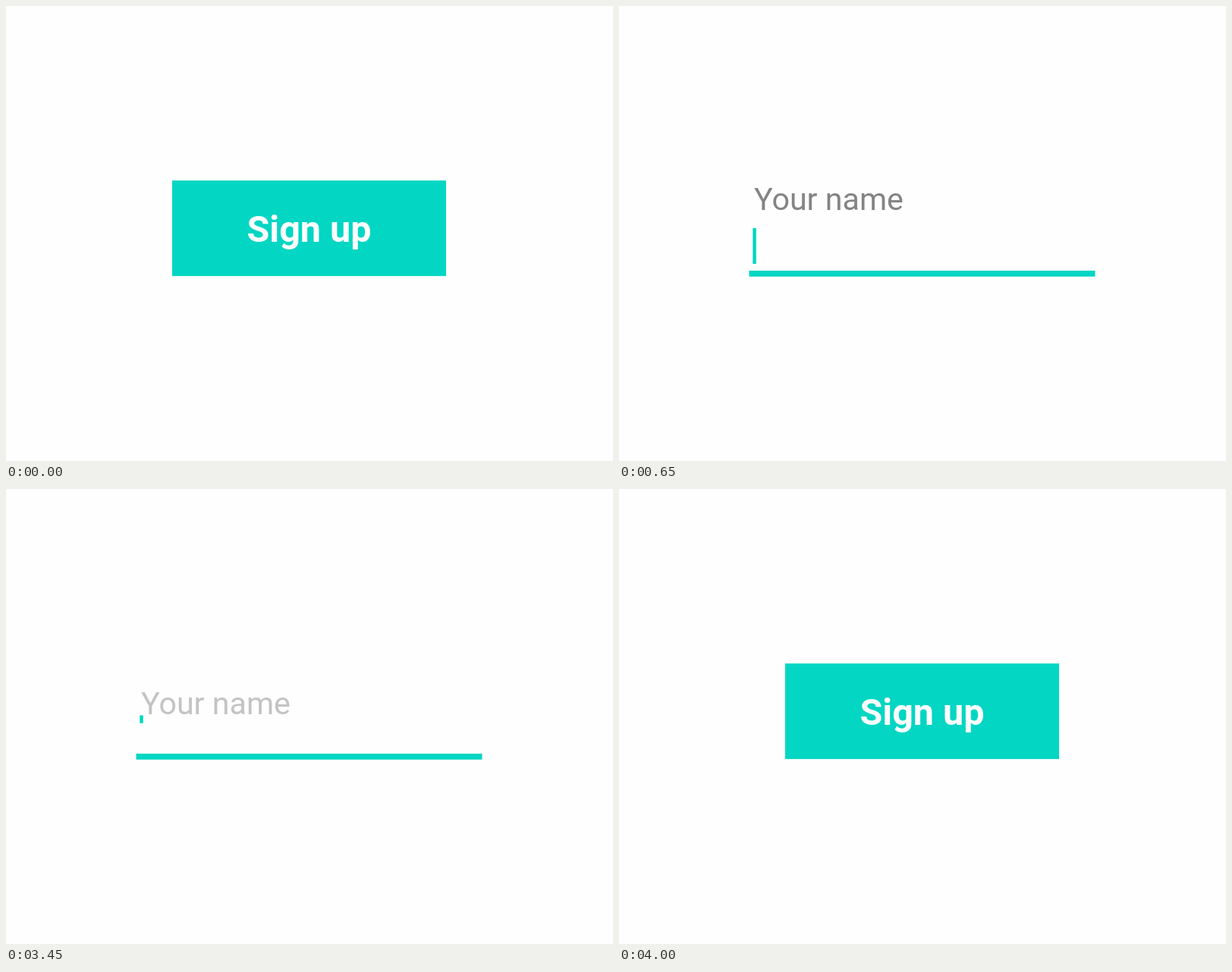
Animation of 800x600 px, one loop 4750 ms. Source, as an HTML page with a canvas:

```html
<!DOCTYPE html>
<html lang="en">
<head>
<meta charset="utf-8">
<title>Sign up button</title>
<style>
  html, body { margin: 0; width: 100%; height: 100%; overflow: hidden; background: #fefefe; }
  canvas { display: block; }
</style>
</head>
<body>
<canvas id="stage" width="800" height="600"></canvas>
<script>
const ctx = document.getElementById('stage').getContext('2d');
const LOOP = 4750, STEP = 50;
const TEAL = '#03d6c3', PAPER = '#fefefe', GREY = '#848484';

const mix = (a, b, k) => a + (b - a) * k;

// Cubic ease-out from 0 to 1
function ease(t, start, duration) {
  const u = Math.min(1, Math.max(0, (t - start) / duration));
  return 1 - (1 - u) ** 3;
}

// 0 -> 1 on the way in, back to 0 on the way out
const inOut = (t, inAt, inFor, outAt, outFor) =>
  ease(t, inAt, inFor) - ease(t, outAt, outFor);

function drawBar(t) {
  const flat = inOut(t, 0, 400, 3600, 400);
  const wide = inOut(t, 150, 320, 3700, 340);
  const left = mix(219, 171.5, wide), right = mix(580, 627.5, wide);
  const bottom = mix(356.1, 356.8, flat), height = mix(126, 7.8, flat);
  ctx.fillStyle = TEAL;
  ctx.fillRect(left, bottom - height, right - left, height);

  // The caption shows only where the bar lies behind it
  ctx.save();
  ctx.beginPath();
  ctx.rect(left, bottom - height, right - left, height);
  ctx.clip();
  ctx.fillStyle = PAPER;
  ctx.font = 'bold 48.5px Roboto, sans-serif';
  ctx.textAlign = 'center';
  ctx.fillText('Sign up', 399.5, 310.5);
  ctx.restore();
}

function drawLabel(t) {
  const shown = inOut(t, 250, 400, 3363, 400);
  ctx.globalAlpha = shown;
  ctx.fillStyle = GREY;
  ctx.font = '41.2px Roboto, sans-serif';
  ctx.textAlign = 'left';
  ctx.fillText('Your name', 178, mix(322.5, 268.5, shown));
  ctx.globalAlpha = 1;
}

function drawCaret(t) {
  const blinkedOff = (t >= 1300 && t < 1850) || (t >= 2450 && t < 3000);
  if (blinkedOff) return;
  const size = inOut(t, 270, 400, 3291, 400);
  ctx.fillStyle = TEAL;
  ctx.fillRect(176.3, 300 - 7 * size, 4.5, 47 * size);
}

function frame(now) {
  const t = Math.floor((now % LOOP) / STEP) * STEP;
  ctx.fillStyle = PAPER;
  ctx.fillRect(0, 0, 800, 600);
  drawLabel(t);
  drawCaret(t);
  drawBar(t);
  requestAnimationFrame(() => frame(performance.now() - begin));
}

const begin = performance.now();
frame(0);
</script>
</body>
</html>
```
